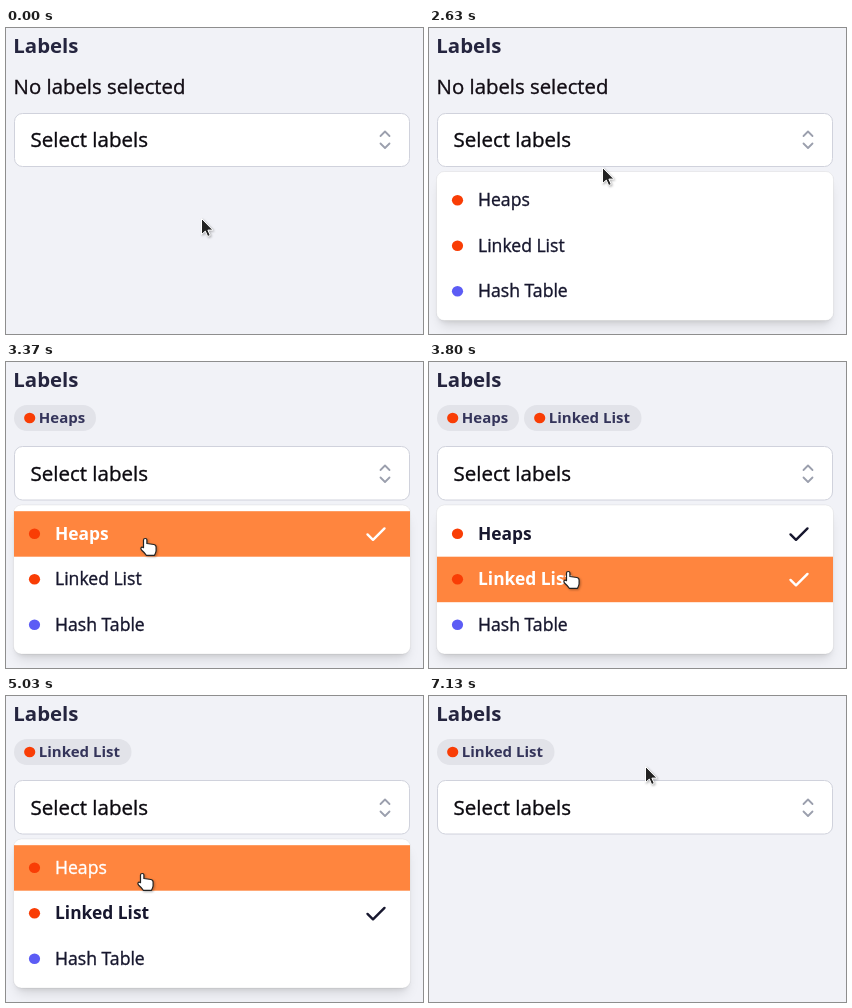
An HTML page that plays this animation: 417x306 px, repeating every 7.33 s.

```html
<!DOCTYPE html>
<html lang="en">
<head>
<meta charset="utf-8">
<title>Label picker</title>
<style>
  html, body { margin: 0; width: 100%; height: 100%; overflow: hidden; background: #f1f2f7; }
  svg { display: block; font-family: "Open Sans", "Noto Sans", sans-serif; }
  .line { fill: none; stroke-linecap: round; stroke-linejoin: round; }
  .cast { filter: drop-shadow(0 9px 6px rgba(0, 0, 0, .12)); }
  .near { filter: drop-shadow(0 3px 2px rgba(0, 0, 0, .09)); }
  .cursor { filter: drop-shadow(1px 1px 1px rgba(0, 0, 0, .3)); }
</style>
</head>
<body>
<svg id="stage" width="417" height="306" viewBox="0 0 417 306"></svg>
<script>
const LOOP = 7330, ROW_TOP = 149.2, ROW_H = 45.5;
const RED = '#f93d05', BLUE = '#5c5cf5', ORANGE = '#ff853e', INK = '#17172e';
const labels = [
  { name: 'Heaps', color: RED, chip: 82, from: 3170, to: 5030 },
  { name: 'Linked List', color: RED, chip: 117.5, from: 3800, to: LOOP },
  { name: 'Hash Table', color: BLUE, chip: 118, from: LOOP, to: LOOP }
];
// Pointer moves: first step, last step, step count, end x, end y
const start = [195.5, 190.5];
const moves = [
  [800, 1330, 7, 206.5, 124.5],
  [2430, 2630, 3, 173.5, 139.5],
  [2700, 2930, 5, 139.5, 176.5],
  [3430, 3640, 4, 139.5, 209.5],
  [4500, 4830, 5, 136.5, 177.5],
  [5630, 6070, 7, 221.5, 65.5],
  [6830, 7130, 4, 216.5, 70.5]
];

function pointer(t) {
  let [x, y] = start;
  for (const [a, b, n, endX, endY] of moves) {
    if (t < a) break;
    const p = Math.min(1, (Math.floor((t - a) / (b - a) * (n - 1)) + 1) / n);
    x += (endX - x) * p;
    y += (endY - y) * p;
  }
  return [x, y];
}

// Regular text gets a hairline stroke for a sturdier weight
const text = (x, y, size, str, fill, weight = 400) =>
  `<text x="${x}" y="${y}" font-size="${size}" font-weight="${weight}" fill="${fill}"` +
  ` stroke="${fill}" stroke-width="${weight > 400 ? 0 : .35}">${str}</text>`;
const rect = (x, y, w, h, r, fill, more = '') =>
  `<rect x="${x}" y="${y}" width="${w}" height="${h}" rx="${r}" fill="${fill}" ${more}/>`;
const dot = (x, y, fill) => `<ellipse cx="${x}" cy="${y}" rx="5.6" ry="5.3" fill="${fill}"/>`;
const line = (d, color, width) =>
  `<path class="line" d="${d}" stroke="${color}" stroke-width="${width}"/>`;

function chips(chosen) {
  let x = 8;
  return chosen.map(l => {
    const s = rect(x, 43, l.chip, 26, 13, '#e2e3e9') + dot(x + 15.7, 56, l.color) +
      text(x + 24.8, 61, 15, l.name, '#34345a', 700);
    x += l.chip + 5;
    return s;
  }).join('');
}

function row(label, i, active, picked) {
  const y = ROW_TOP + i * ROW_H, mid = y + 22.6;
  return (active ? rect(8, y, 396, ROW_H, 0, ORANGE) : '') +
    dot(28.5, mid, label.color) +
    text(49, mid + 6, picked ? 17.4 : 17.6, label.name, active ? '#fff' : INK, picked ? 700 : 400) +
    (picked ? line(`M361.5 ${mid + .6}l5.5 5.4 11.5-11.4`, active ? '#fff' : INK, 2.4) : '');
}

function panel(t, hover, shift) {
  return `<g transform="translate(0 ${shift})">` +
    rect(11, 147, 390, 141, 6, '#fff', 'class="cast"') +
    rect(10, 147, 392, 143, 6, '#fff', 'class="near"') +
    rect(7.5, 143, 397, 149, 8, '#fff', 'stroke="#000" stroke-opacity=".06"') +
    labels.map((l, i) => row(l, i, i === hover, t >= l.from && t < l.to)).join('') + '</g>';
}

function cursor(x, y, hand) {
  const shape = hand
    ? '<path d="M-2 1.6Q-2 0-.3 0T1.4 1.6V5L8.4 6Q10.6 6.4 10.6 8.6V12.5Q10.2 14.5 9 16.8H.8Q-.6 14.4-4 11.5Q-5.4 9.6-3.6 8.5L-2 9.2Z" fill="#fff" stroke="#222" stroke-width="1.2" stroke-linejoin="round"/>'
    : '<path d="M0 0V16L3.8 12.6 6.2 18 8.8 16.9 6.4 11.6H11.4Z" fill="#222" stroke="#fff" stroke-width="1"/>';
  return `<g class="cursor" transform="translate(${x} ${y})">${shape}</g>`;
}

function scene(t) {
  const [x, y] = pointer(t);
  const open = t >= 1870 && t < 6230;
  const chosen = labels.filter(l => t >= l.from && t < l.to);
  const up = chosen.length ? 1 : 0;
  const i = Math.floor((y - ROW_TOP) / ROW_H);
  const hover = open && i >= 0 && i < 3 ? i : -1;
  const hand = hover >= 0 || (y >= 85 && y < 139);
  return text(7.3, 25, 20.4, 'Labels', '#25253f', 700) +
    (up ? chips(chosen) : text(7.6, 66, 20.35, 'No labels selected', '#120c14')) +
    rect(8.5, 85.5 - up, 395, 53 + up / 2, 8, '#fff', 'stroke="#d0d2dc"') +
    text(24.6, 119, 20.5, 'Select labels', '#0c0a10') +
    line('M374.5 108l4.5-4.5 4.5 4.5M374.5 115.5l4.5 4.5 4.5-4.5', '#9b9fad', 1.8) +
    (open ? panel(t, hover, up ? 0 : .5) : '') +
    cursor(x, y, hand);
}

const stage = document.getElementById('stage');
const began = performance.now();
let last = '';
function draw() {
  const next = scene((performance.now() - began) % LOOP);
  if (next !== last) stage.innerHTML = last = next;
  requestAnimationFrame(draw);
}
draw();
</script>
</body>
</html>
```
